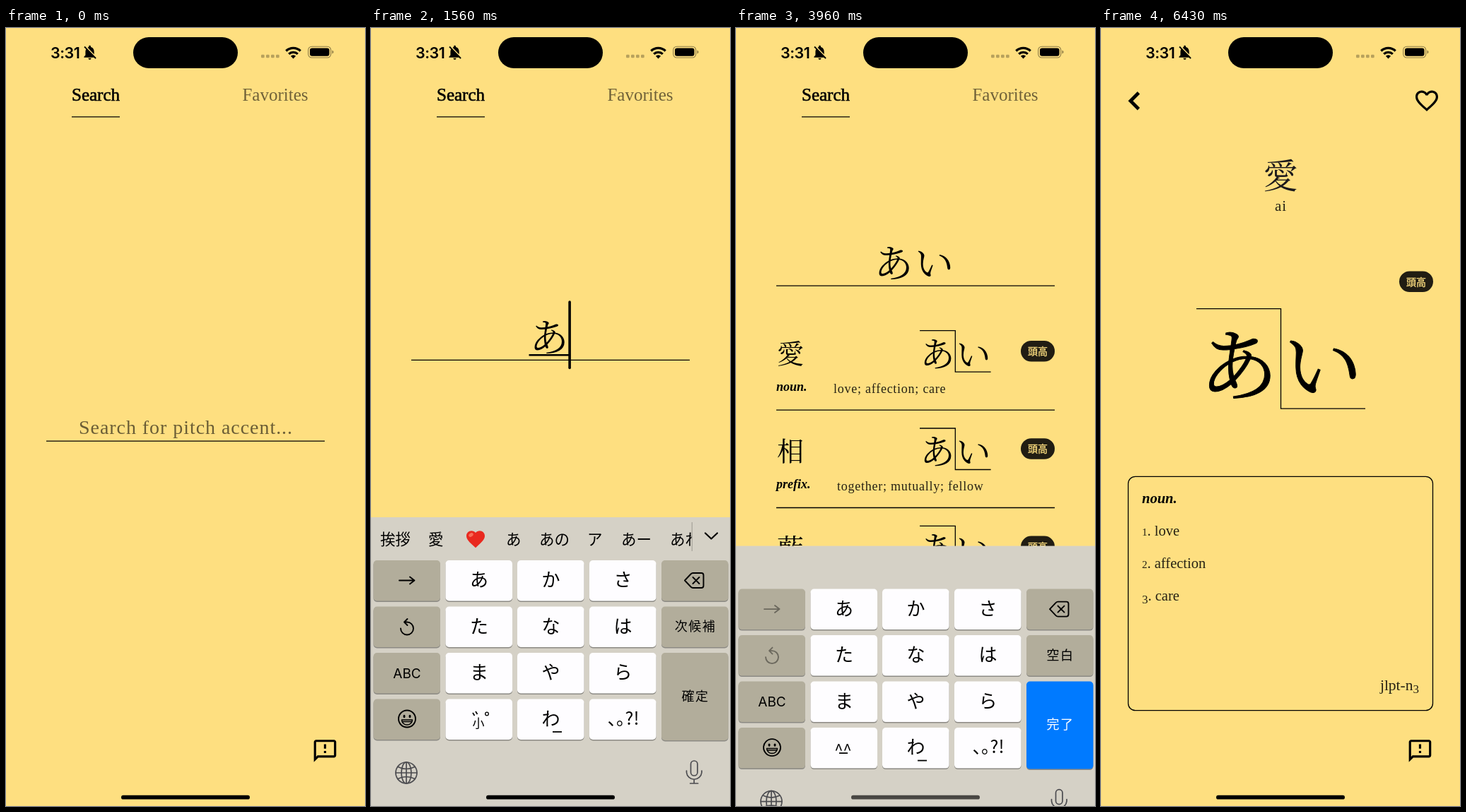
Recreate the animation shown at these times as an HTML page. Size 508 by 1102 pixels, loop 8000 ms.

```html
<!DOCTYPE html>
<html lang="ja">
<head>
<meta charset="utf-8">
<title>Pitch accent search</title>
<style>
html, body { margin: 0; width: 100%; height: 100%; overflow: hidden; background: #fedf80; }
svg { display: block; width: 100vw; height: 100vh; }
text { font-family: "Liberation Serif", "Noto Serif CJK JP", "Noto Sans CJK JP", "Noto Sans CJK", serif; white-space: pre; }
.ui { font-family: "Noto Sans CJK JP", "Noto Sans CJK", sans-serif; }
.latin { font-family: Inter, "Liberation Sans", sans-serif; }
.mid { text-anchor: middle; }
.pos { font-weight: bold; font-style: italic; }
.soft { opacity: .85; }
.brush { stroke: #000; stroke-width: .9; }
.line { fill: none; stroke: #000; stroke-width: 1.3; }
.icon { fill: none; stroke: #000; stroke-width: 1.9; stroke-linecap: round; stroke-linejoin: round; }
.grey { stroke: #4c4c50; stroke-width: 1.7; }
</style>
</head>
<body>
<svg id="stage" viewBox="0 0 508 1102" preserveAspectRatio="none"></svg>
<script>
const HEART = 'M16.5 3c-1.74 0-3.41.81-4.5 2.09C10.91 3.81 9.24 3 7.5 3 4.42 3 2 5.42 2 8.5c0 3.78 3.4 6.86 8.55 11.54L12 21.35l1.45-1.32C18.6 15.36 22 12.28 22 8.5 22 5.42 19.58 3 16.5 3z';
const text = (x, y, size, str, cls = '', extra = '') =>
  `<text x="${x}" y="${y}" font-size="${size}" class="${cls}" ${extra}>${str}</text>`;
const mid = (x, y, size, str, cls = '', extra = '') => text(x, y, size, str, 'mid ' + cls, extra);
const path = (d, cls = 'line', extra = '') => `<path d="${d}" class="${cls}" ${extra}/>`;
const rect = (x, y, w, h, r, fill, extra = '') =>
  `<rect x="${x}" y="${y}" width="${w}" height="${h}" rx="${r}" fill="${fill}" ${extra}/>`;
const group = (id, body, extra = '') => `<g id="${id}" ${extra}>${body}</g>`;
const glyph = (x, y, scale, d) => `<path transform="translate(${x} ${y}) scale(${scale})" d="${d}"/>`;

const badge = (x, y, label) =>
  rect(x, y, 48, 29.5, 14.75, '#211d13') +
  mid(x + 24, y + 20, 14, label, 'ui', 'fill="#fedf80" stroke="#fedf80" stroke-width=".3"');

// Old-style figures: x-height digits, with the 3 hanging below the baseline
const oldStyle = str => str.replace(/\d/g, d =>
  `<tspan font-size="${d === '3' ? 17 : 15}" baseline-shift="${d === '3' ? -4 : 0}">${d}</tspan>`);

// Pitch line: high then low, or low then high when flat
const accent = (x, y, w, h, flat) => {
  const [a, b] = flat ? [y + h, y] : [y, y + h];
  return path(`M${x} ${a}h${w}V${b}h${w}`);
};

function results(id, rows) {
  return group(id, rows.map(([kanji, kana, pos, meaning, flat], i) => `<g transform="translate(0 ${i * 138.3})">` +
    text(58, 474.5, 38, kanji) +
    accent(260, 428.7, 50.3, 58.5, flat) +
    mid('285 336', 479.5, 49, kana) +
    badge(403, 443, flat ? '平板' : '頭高') +
    text(57, 514, 18, pos, 'pos') +
    text(pos === 'prefix.' ? 143 : 138, 517, 18, meaning, 'soft', 'letter-spacing=".75"') +
    path('M57 541.2h394') + '</g>').join(''));
}

const searchPage = group('search',
  rect(0, 0, 508, 1102, 0, '#fedf80') +
  mid(127, 103, 25, 'Search', '', 'stroke="#000" stroke-width=".6"') +
  path('M93 125.8h68') +
  mid(381, 103, 25, 'Favorites', '', 'opacity=".56"') +
  group('field',
    mid(254.5, 575, 28, 'Search for pitch accent...', '', 'id="hint" letter-spacing=".95" opacity=".58"') +
    path('M57 585.1h394') +
    mid('223 280', 573, 55, '', '', 'id="typed"') +
    path('', 'line', 'id="compose" style="stroke-width:2.5"') +
    rect(-1.8, 501, 3.6, 97, 1.8, '#000', 'id="cursor"')) +
  '<g clip-path="url(#listClip)">' +
  results('first', [
    ['仇', 'あだ', 'noun.', 'foe; enemy; rival', true],
    ['兄', 'あに', 'noun.', 'older brother; elder brother']]) +
  results('second', [
    ['愛', 'あい', 'noun.', 'love; affection; care'],
    ['相', 'あい', 'prefix.', 'together; mutually; fellow'],
    ['藍', 'あい', 'noun.', "dyer's knotweed (Persicaria tinctoria,"],
    ['間', 'あい', 'noun.', 'space (between); gap; interval;'],
    ['', 'あい', 'noun.', '']]) + '</g>');

const detailPage = group('detail',
  rect(0, 0, 508, 1102, 0, '#fedf80') +
  path('M53.3 91.8L41.8 103.3l11.5 11.5', 'line', 'style="stroke-width:4.8"') +
  `<path transform="translate(441.8 83.8) scale(1.6)" d="${HEART}M12 18.7C7.1 14.2 4 11.4 4 8.5 4 6.5 5.5 5 7.5 5c1.54 0 3.04.99 3.57 2.36h1.87C13.46 6 14.96 5 16.5 5c2 0 3.5 1.5 3.5 3.5 0 2.9-3.1 5.7-8 10.2z" fill-rule="evenodd"/>` +
  mid(254, 227, 49, '愛', '', 'fill="#1c1a1c"') +
  mid(254.5, 259, 21, 'ai', 'soft', 'letter-spacing="1"') +
  badge(422, 344.5, '頭高') +
  accent(135, 397.7, 119.5, 141.5) +
  mid('195 314', 520, 112, 'あい', 'brush') +
  rect(38.5, 635.3, 431, 331.4, 10, 'none', 'stroke="#000" stroke-width="1.3"') +
  text(58, 673, 20.5, 'noun.', 'pos') +
  ['love', 'affection', 'care'].map((w, i) => text(58, 719 + 46 * i, 20.5, oldStyle(`${i + 1}. ${w}`), 'soft')).join('') +
  text(450, 938, 21.5, oldStyle('jlpt-n3'), 'soft', 'text-anchor="end"'));

// Keyboard
const colX = [3.5, 105.5, 207, 309, 411], rowY = [754, 819.5, 885, 950.5];
const key = (c, r, fill, extra = '', h = 57.5) =>
  rect(colX[c], rowY[r] + 1.5, 94.5, h, 5, '#8c8a84') + rect(colX[c], rowY[r], 94.5, h, 5, fill, extra);
const DARK = '#b2ad9b', WHITE = '#fefdff';
const kana = ['あ', 'か', 'さ', 'た', 'な', 'は', 'ま', 'や', 'ら', '', 'わ', ''];
const candidates = (id, words) => group(id,
  '<g clip-path="url(#barClip)">' + [[13, '挨拶'], [81, '愛'], ...words].map(([x, w]) => text(x, 732, 21.5, w, 'ui')).join('') + '</g>');
const label = (y, str, fill = '#000') => mid(459, y, 18, str, 'ui', `letter-spacing="1.5" fill="${fill}"`);

const keyboard = group('keyboard',
  rect(0, 693, 508, 830, 0, '#d5d1c6') +
  [0, 1, 2, 3].map(r => key(0, r, DARK)).join('') +
  kana.map((k, i) => {
    const c = 1 + i % 3, r = Math.floor(i / 3);
    return key(c, r, WHITE, i ? '' : 'id="keyA"') + mid(colX[c] + 47.5, rowY[r] + 37, 26, k, 'ui');
  }).join('') +
  key(4, 0, DARK) + key(4, 1, DARK) +
  path('M40 782.5h21m-6-5l6.5 5-6.5 5', 'icon', 'id="arrow"') +
  path('M42 850.5a9 9 0 1 0 9-9h-4m4.5-4.5l-4.5 4.5 4.5 4.5', 'icon', 'id="undo"') +
  mid(51, 920.5, 19, 'ABC', 'latin') +
  '<circle cx="51" cy="978.5" r="12" class="icon"/><ellipse cx="47" cy="975" rx="1.5" ry="2.2"/><ellipse cx="55" cy="975" rx="1.5" ry="2.2"/>' +
  path('M43.5 980h15a7.5 7 0 0 1-15 0zm1 2.5h13', 'icon', 'style="stroke-width:1.5"') +
  path('M257 997h13', 'line', 'style="stroke-width:1.8"') +
  mid(357, 986.5, 25, '、。?!', 'ui', 'style="font-feature-settings:\'halt\'"') +
  path('M444 782.5l8.5-9q1.5-1.5 3-1.5h12q3 0 3 3v15q0 3-3 3h-12q-1.5 0-3-1.5zm11.5-4.5l9 9m0-9l-9 9', 'icon') +
  group('idle',
    mid(151.5, 990, 22, '^^', 'ui') + path('M146 986.5h12', 'line', 'style="stroke-width:1.8"') +
    label(854, '空白') + key(4, 2, '#007aff', '', 124) + label(952.5, '完了', '#fff')) +
  group('composing',
    mid(152, 991, 17, '小', 'ui') + path('M144 970l2.5 4m1.5-6l2.5 4', 'line', 'style="stroke-width:1.7"') +
    '<circle cx="164" cy="971.5" r="2.3" class="line"/>' +
    label(854, '次候補') + key(4, 2, DARK, '', 124) + label(952.5, '確定') +
    `<path transform="translate(132.4 708.4) scale(1.3)" d="${HEART}" fill="#e9291f"/>` +
    '<ellipse cx="141.5" cy="718" rx="3.5" ry="2.5" fill="#ff8a70" opacity=".7" transform="rotate(-35 141.5 718)"/>' +
    candidates('barA', [[191, 'あ'], [238, 'あの'], [306, 'ア'], [354, 'あー'], [423, 'あれ']]) +
    candidates('barAi', [[190, 'あい'], [259, 'アイ'], [327, '藍'], [376, '会い'], [444, '合']]) +
    path('M454.3 700v41', 'line', 'style="stroke:#a9a69d"') +
    path('M473 715.5l8.5 8 8.5-8', 'icon', 'style="stroke-width:2.2"')) +
  '<g transform="translate(50 1055)"><circle r="15" class="icon grey"/><ellipse rx="7" ry="15" class="icon grey"/>' +
  path('M0-15v30M-15 0h30M-12-8.5q12 6 24 0M-12 8.5q12-6 24 0', 'icon grey') + '</g>' +
  rect(452.5, 1038, 9.5, 21, 4.75, 'none', 'class="icon grey"') +
  path('M446.5 1052v2.5a10.8 10.8 0 0 0 21.5 0v-2.5M457.2 1065v5m-5.5 0h11', 'icon grey'));

const feedback = glyph(432.5, 1005, 1.58, 'M20 2H4c-1.1 0-2 .9-2 2v18l4-4h14c1.1 0 2-.9 2-2V4c0-1.1-.9-2-2-2zm0 14H5.17L4 17.17V4h16zm-9-4h2v2h-2zm0-6h2v4h-2z');

const statusBar =
  text(63, 42.5, 21.5, '3:31', 'latin', 'font-weight="600" letter-spacing="-.5"') +
  glyph(106.3, 22.3, 1.02, 'M20 18.69 7.84 6.14 5.27 3.49 4 4.76l2.8 2.8C6.28 8.56 6 9.73 6 10.99v5l-2 2v1h13.73l2 2L21 19.72zM12 22c1.11 0 2-.89 2-2h-4c0 1.11.89 2 2 2zm6-7.32V11c0-3.08-1.64-5.64-4.5-6.32V4c0-.83-.67-1.5-1.5-1.5s-1.5.67-1.5 1.5v.68c-.5.1-1 .3-1.43.55z') +
  rect(180, 13, 148, 44, 22, '#000') +
  [0, 1, 2, 3].map(i => rect(361 + 7 * i, 37.7, 4.7, 4.5, 1.2, '#000', 'opacity=".28"')).join('') +
  path('M396.3 32.5a14.5 14.5 0 0 1 20.4 0M400.2 36.9a9 9 0 0 1 12.6 0', 'line', 'style="stroke-width:3.2"') +
  '<path d="M402.9 39.8a5 5 0 0 1 7.2 0l-3.6 3.7z"/>' +
  rect(427.7, 26.2, 32, 15.8, 5, 'none', 'stroke="#000" stroke-opacity=".45" stroke-width="1.1"') +
  rect(430, 28.5, 27.5, 11.2, 3, '#000') +
  '<path d="M461.5 31.5q2 .8 2 2.5t-2 2.5z" opacity=".45"/>';

document.getElementById('stage').innerHTML =
  '<clipPath id="listClip"><path d="M0 0h508v986H0z"/></clipPath>' +
  '<clipPath id="barClip"><path d="M0 693h454v61H0z"/></clipPath>' +
  searchPage + detailPage + feedback + keyboard + statusBar +
  rect(163, 1086.8, 182, 5.8, 2.9, '#000', 'id="home"');

const el = id => document.getElementById(id);
const show = (id, on) => { el(id).style.display = on ? '' : 'none'; };
const move = (id, x, y) => el(id).setAttribute('transform', `translate(${x} ${y})`);
const clamp = v => Math.min(1, Math.max(0, v));
const easeOut = v => 1 - (1 - clamp(v)) ** 3;
const spring = ms => { const k = Math.max(0, ms) * .01826; return 1 - (1 + k) * Math.exp(-k); };

// Times of the events in ms
const FOCUS = 500, TYPE_A = 1500, TYPE_I = 2300, CONFIRM = 3680, BLUR = 3932, OPEN = 6070, LOOP = 8000;

function draw(t) {
  const typed = t < TYPE_A ? '' : t < TYPE_I ? 'あ' : 'あい';
  const composing = t >= TYPE_A && t < CONFIRM;
  const focused = t >= FOCUS && t < BLUR;

  move('field', 0, -220 * easeOut((t - TYPE_A) / 280));
  show('hint', !typed);
  el('typed').textContent = typed;
  el('typed').setAttribute('x', typed.length === 1 ? '252' : '223 280.5');
  const half = 28.5 * typed.length;
  el('compose').setAttribute('d', composing ? `M${252 - half} 578h${2 * half}` : '');

  // The blink restarts with every edit
  const lastEdit = [CONFIRM, TYPE_I, TYPE_A, FOCUS].find(e => t >= e) || 0;
  const phase = (t - lastEdit) % 1000 / 1000;
  move('cursor', 252.6 + half, 0);
  el('cursor').style.opacity = focused ? Math.max(clamp((.65 - phase) / .15), clamp((phase - .85) / .15)) : 0;

  show('first', t >= 1760 && t < 2500);
  show('second', t >= 2500);

  move('keyboard', 0, 409 * (1 - spring(t - 550) + spring(t - BLUR)));
  show('keyboard', t > 550 && t < 4500);
  show('idle', !composing);
  show('composing', composing);
  show('barA', typed === 'あ');
  show('barAi', typed === 'あい');
  const pressed = (t >= 1400 && t < TYPE_A) || (t >= 1900 && t < TYPE_I);
  el('keyA').setAttribute('fill', pressed ? '#adadad' : WHITE);
  el('arrow').style.opacity = typed === 'あ' ? 1 : .4;
  el('undo').style.opacity = composing ? 1 : .4;
  el('home').setAttribute('fill', t >= 2500 && t < 4200 ? '#494743' : '#000');

  const push = easeOut((t - OPEN) / 360);
  move('search', -169 * push, 0);
  move('detail', 508 * (1 - push), 0);
  show('detail', push > 0);
}

const start = performance.now();
(function frame() {
  draw((performance.now() - start) % LOOP);
  requestAnimationFrame(frame);
})();
</script>
</body>
</html>
```
